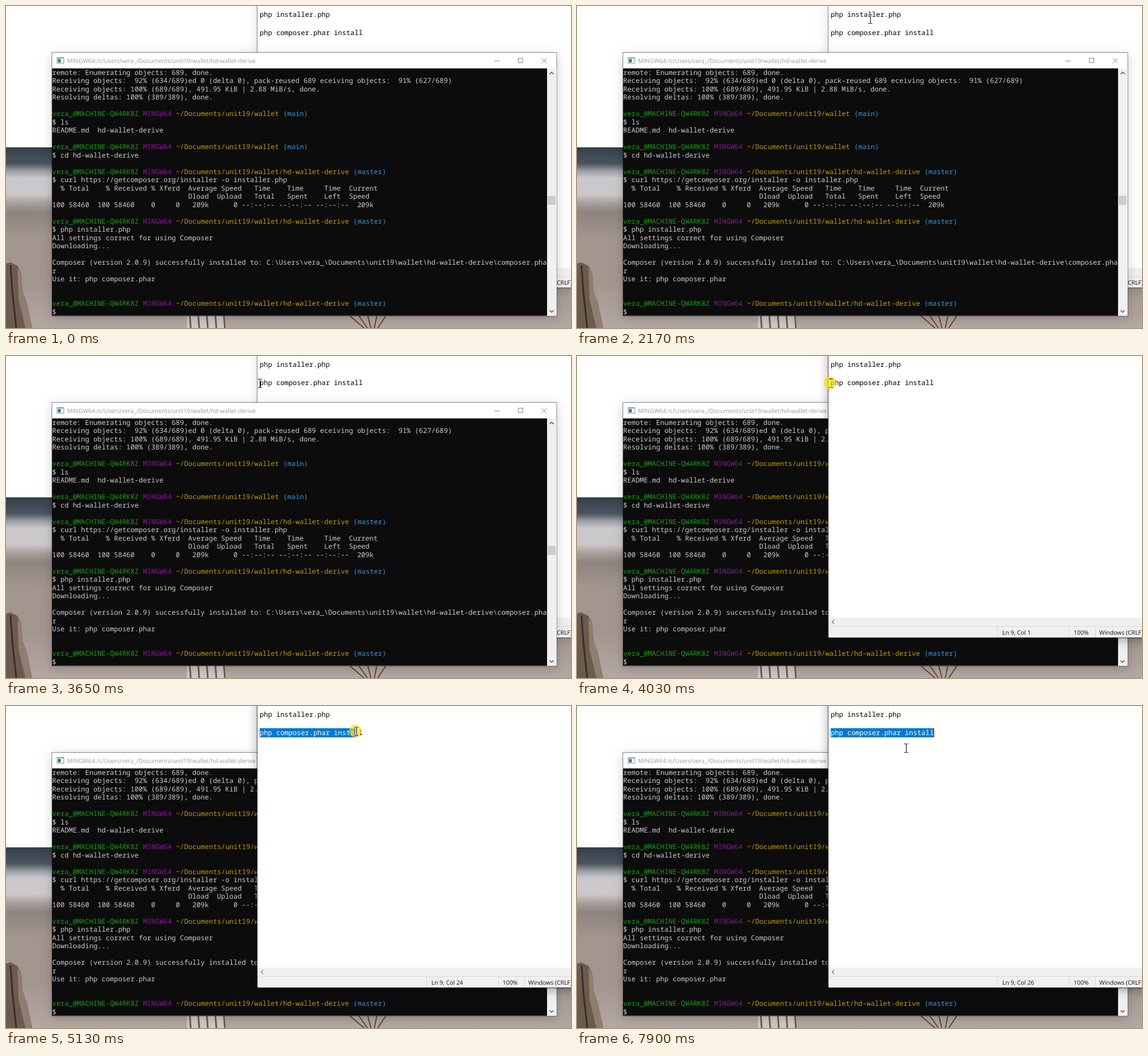
An HTML page with a canvas for the animation above (7.99 s loop, 991 px wide and 565 px high).

```html
<!DOCTYPE html>
<html lang="en">
<head>
<meta charset="utf-8">
<title>Terminal and editor</title>
<style>
  html, body { margin: 0; width: 100%; height: 100%; overflow: hidden; background: #fff; }
  canvas { display: block; }
</style>
</head>
<body>
<canvas id="stage" width="991" height="565"></canvas>
<script>
const ctx = document.getElementById('stage').getContext('2d');
const LOOP = 7990, CLICK = 4030, DRAG_END = 5280, RELEASE = 5830;
const CHAR = 7.236, LINE = 14.48;
const MONO = '12.06px "Noto Sans Mono", monospace';
const UI = '10.42px "Open Sans", sans-serif';
const COMMAND = 'php composer.phar install';

const FG = '#cccccc', GREEN = '#13a10e', PURPLE = '#881798', YELLOW = '#c19c00', BLUE = '#3a96dd';
const prompt = (path, branch) => [
  ['vera_@MACHINE-QW4RK8Z ', GREEN], ['MINGW64 ', PURPLE],
  ['~/Documents/unit19/wallet' + path + ' ', YELLOW], ['(' + branch + ')', BLUE]
];
const derive = prompt('/hd-wallet-derive', 'master');
const terminalLines = [
  'remote: Enumerating objects: 689, done.',
  'Receiving objects:  92% (634/689)ed 0 (delta 0), pack-reused 689 eceiving objects:  91% (627/689)',
  'Receiving objects: 100% (689/689), 491.95 KiB | 2.88 MiB/s, done.',
  'Resolving deltas: 100% (389/389), done.',
  '',
  prompt('', 'main'),
  '$ ls',
  'README.md  hd-wallet-derive',
  '',
  prompt('', 'main'),
  '$ cd hd-wallet-derive',
  '',
  derive,
  '$ curl https://getcomposer.org/installer -o installer.php',
  '  % Total    % Received % Xferd  Average Speed   Time    Time     Time  Current',
  '                                 Dload  Upload   Total   Spent    Left  Speed',
  '100 58460  100 58460    0     0   209k      0 --:--:-- --:--:-- --:--:--  209k',
  '',
  derive,
  '$ php installer.php',
  'All settings correct for using Composer',
  'Downloading...',
  '',
  'Composer (version 2.0.9) successfully installed to: C:\\Users\\vera_\\Documents\\unit19\\wallet\\hd-wallet-derive\\composer.pha',
  'r',
  'Use it: php composer.phar',
  '', '',
  derive,
  '$'
];

// Pointer moves: start, end, steps, target x, target y, linear
const moves = [
  [300, 690, 6, 625, 155, true],
  [840, 1240, 6, 522.5, 29.5],
  [1390, 1630, 4, 518.5, 24.5],
  [1780, 1940, 3, 515, 23.5],
  [2170, 2950, 11, 463.5, 61.5],
  [3020, 3420, 6, 443.5, 49.5],
  [3570, 3650, 2, 445.5, 48.5],
  [4260, 5050, 11, 602, 48, true],
  [5130, 5280, 3, 640, 41, true],
  [5450, 5451, 1, 641, 41.5],
  [6150, 6690, 8, 579, 73],
  [7900, 7901, 1, 577.5, 74.5]
];

function pointerAt(t) {
  let x = 1033, y = 640;
  for (const [start, end, steps, toX, toY, linear] of moves) {
    if (t < start) break;
    const step = Math.floor((t - start) / (end - start) * (steps - 1) + 1e-6) + 1;
    const p = Math.min(1, step / steps);
    const k = linear ? p : p ** 3 * (p * (6 * p - 15) + 10);
    x += (toX - x) * k;
    y += (toY - y) * k;
  }
  return [x, y];
}

function rect(x, y, w, h, color) {
  ctx.fillStyle = color;
  ctx.fillRect(x, y, w, h);
}

function text(str, x, y, color, font) {
  ctx.font = font;
  ctx.fillStyle = color;
  ctx.fillText(str, x, y);
}

function line(points, color, width = 1) {
  ctx.beginPath();
  points.forEach(([x, y]) => ctx.lineTo(x, y));
  ctx.strokeStyle = color;
  ctx.lineWidth = width;
  ctx.stroke();
}

function shape(points, color) {
  ctx.beginPath();
  points.forEach(([x, y]) => ctx.lineTo(x, y));
  ctx.fillStyle = color;
  ctx.fill();
}

// Shadow and translucent one-pixel border around a window's contents
function windowFrame(x, y, w, h, shadow, border) {
  ctx.save();
  ctx.beginPath();
  ctx.rect(0, 0, 991, 565);
  ctx.rect(x, y, w, h);
  ctx.clip('evenodd');
  ctx.shadowColor = `rgba(0,0,0,${shadow})`;
  ctx.shadowBlur = 17;
  ctx.shadowOffsetY = 4;
  rect(x, y, w, h, '#000');
  ctx.restore();
  ctx.strokeStyle = `rgba(0,0,0,${border})`;
  ctx.lineWidth = 1;
  ctx.strokeRect(x - .5, y - .5, w + 1, h + 1);
}

function drawBackdrop() {
  const photo = ctx.createLinearGradient(0, 248, 0, 565);
  [[0, '#333f4a'], [.09, '#4b545e'], [.13, '#9a9ca2'], [.17, '#c9c9cd'], [.26, '#cdc8c8'],
   [.31, '#a89e9a'], [.36, '#8f847e'], [.5, '#a2968f'], [.75, '#a3968f'], [1, '#b4a8a2']]
    .forEach(([stop, color]) => photo.addColorStop(stop, color));
  rect(0, 248, 991, 317, photo);
  shape([[0, 452], [8, 450], [20, 456], [27, 470], [29, 500], [37, 522], [46, 565], [0, 565]], '#6b5a4e');
  shape([[20, 460], [27, 470], [29, 500], [37, 522], [46, 565], [34, 565], [22, 515]], '#8f7d70');
  line([[8, 455], [11, 500], [18, 565]], '#3a2e27', 3);
  shape([[318, 540], [384, 540], [386, 565], [317, 565]], '#cfc8c3');
  for (let x = 322; x < 388; x += 15) line([[x, 540], [x + 2, 565]], '#6c5c53', 3);
  for (let i = 0; i < 5; i++) line([[600 + i * 17, 541], [628 + i * 6, 565]], '#5c4b42', 2);
  rect(0, 0, 991, 248, '#fff');
}

function drawTerminal() {
  windowFrame(81, 82, 884.5, 461.5, .2, .45);
  rect(81, 82, 884.5, 461.5, '#fff');
  rect(89, 90, 13, 11, '#8f9ba1');
  rect(90, 92, 11, 8, '#f4f7f8');
  rect(91, 93, 5, 6, '#2b7f8c');
  text('MINGW64:/c/Users/vera_/Documents/unit19/wallet/hd-wallet-derive', 107, 99.5, '#999', UI);
  line([[857, 96.5], [866, 96.5]], '#888');
  ctx.strokeRect(898.5, 91.5, 8, 8);
  line([[939.5, 91.5], [948.5, 100.5]], '#888');
  line([[948.5, 91.5], [939.5, 100.5]], '#888');

  rect(81, 109.5, 868, 434, '#0c0c0c');
  rect(949, 109.5, 16.5, 434, '#f0f0f0');
  rect(950, 333, 14, 16, '#cdcdcd');
  line([[953.5, 119.5], [957, 116], [960.5, 119.5]], '#555', 1.5);
  line([[953.5, 534], [957, 537.5], [960.5, 534]], '#555', 1.5);

  terminalLines.forEach((content, row) => {
    const parts = typeof content === 'string' ? [[content, FG]] : content;
    let column = 0;
    for (const [str, color] of parts) {
      text(str, 81 + column * CHAR, Math.round(121 + row * LINE), color, MONO);
      column += str.length;
    }
  });
}

function drawEditor(active, selected) {
  windowFrame(441, -20, 600, 514, active ? .36 : .15, active ? .65 : .45);
  rect(441, 0, 550, 459, '#fff');
  rect(441, 459, 550, 35, '#f0f0f0');
  rect(441, 474, 550, 1, '#d9d9d9');
  [737, 863, 909].forEach(x => rect(x, 475, 1, 19, '#d5d5d5'));
  line([[451, 463], [447.5, 466.5], [451, 470]], '#777', 1.2);
  text('Ln 9, Col ' + (selected + 1), 746, 489, '#111', UI);
  text('100%', 871, 489, '#111', UI);
  text('Windows (CRLF)', 916, 489, '#111', UI);

  text('php installer.php', 445, 19, '#000', MONO);
  text(COMMAND, 445, 51, '#000', MONO);
  if (selected) {
    ctx.save();
    ctx.beginPath();
    ctx.rect(445, 39, Math.round(selected * CHAR) + 1, 16);
    ctx.clip();
    rect(445, 39, 200, 16, '#0078d7');
    text(COMMAND, 445, 51, '#fff', MONO);
    ctx.restore();
  }
}

function drawPointer(x, y, pressed, caretX) {
  if (pressed) {
    ctx.beginPath();
    ctx.arc(x - 2, y - 2, 11, 0, 7);
    ctx.fillStyle = 'rgba(248,222,0,.68)';
    ctx.fill();
  }
  // The caret and the I-beam invert what lies below them
  ctx.globalCompositeOperation = 'difference';
  if (caretX) rect(caretX, 39, 1, 16, '#fff');
  const px = Math.floor(x), py = Math.floor(y);
  for (const edge of [py - 8, py + 7]) {
    rect(px - 3, edge, 3, 1, '#fff');
    rect(px + 1, edge, 3, 1, '#fff');
  }
  rect(px, py - 7, 1, 14, '#fff');
  ctx.globalCompositeOperation = 'source-over';
}

function draw() {
  const t = performance.now() % LOOP;
  const [x, y] = pointerAt(t);
  const active = t >= CLICK;
  let selected = 0;
  if (t >= DRAG_END) selected = COMMAND.length;
  else if (active) selected = Math.max(0, Math.min(COMMAND.length, Math.round((x - 445) / CHAR)));

  ctx.textRendering = 'geometricPrecision';
  drawBackdrop();
  if (active) drawTerminal();
  drawEditor(active, selected);
  if (!active) drawTerminal();

  const blinkedOff = (t >= 5980 && t < 6510) || (t >= 6980 && t < 7530);
  const caretX = active && !blinkedOff ? 445 + Math.round(selected * CHAR) : 0;
  drawPointer(x, y, active && t < RELEASE, caretX);
  requestAnimationFrame(draw);
}
draw();
</script>
</body>
</html>
```
